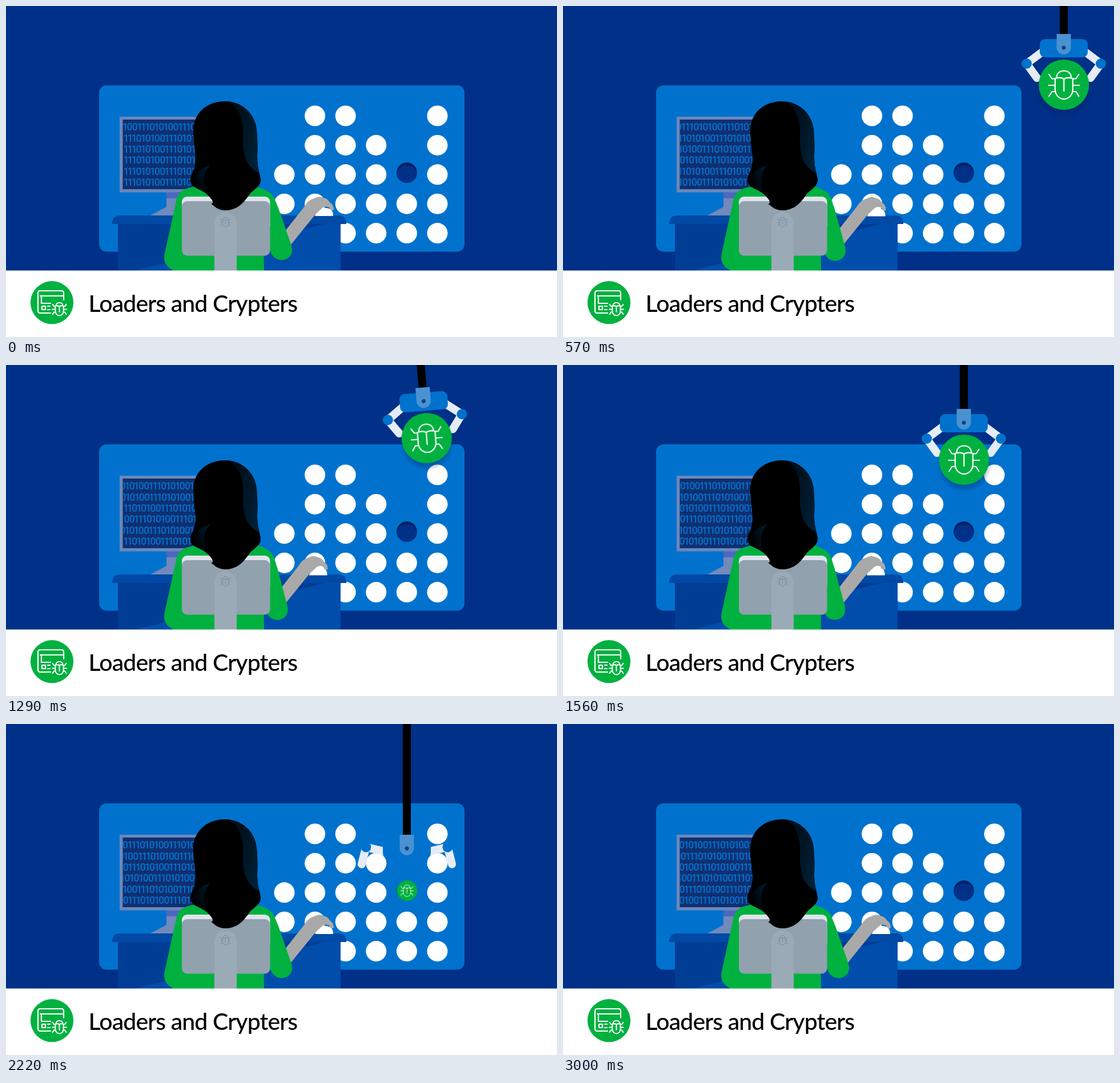
An HTML page that plays this animation: 965 px wide and 580 px high, repeating every 3.03 s.

```html
<!DOCTYPE html>
<html lang="en">
<head>
<meta charset="utf-8">
<title>Loaders and Crypters</title>
<style>
html, body { margin: 0; width: 100%; height: 100%; overflow: hidden; background: #fff; }
svg { display: block; width: 965px; height: 580px; }
.title { font: 500 41px Lato, sans-serif; letter-spacing: -.9px; }
.bits { font: 500 17.500px Roboto, sans-serif; fill: #0072ce; text-anchor: middle; }
.line { fill: none; stroke: #fff; stroke-linecap: round; stroke-linejoin: round; }
.limb { fill: none; stroke: #e6ecf5; stroke-width: 14; }
#ball { filter: drop-shadow(0 8px 3px rgba(0, 25, 85, .3)); }
</style>
</head>
<body>
<svg viewBox="0 0 965 580">
  <defs>
    <g id="bug">
      <path d="M-15.500-11Q-6-14 0-10Q6-14 15.500-11V8C15.500 18 8 25 0 25S-15.500 18-15.500 8ZM-13-12C-13-20-7-24.500 0-24.500S13-20 13-12M0-10V11"/>
      <path id="legs" d="M-26-18L-21-10.500H-15.500M-27 1H-15.500M-26 20L-21 12H-15"/>
      <use href="#legs" transform="scale(-1 1)"/>
    </g>
    <g id="claw-arm">
      <path class="limb" d="M-33 4L-65 28"/>
      <path class="limb" stroke-linecap="round" d="M-65 28L-47 53"/>
      <circle cx="-65" cy="28" r="9" fill="#0072ce"/>
    </g>
    <clipPath id="hole"><circle cx="702" cy="292" r="18"/></clipPath>
    <clipPath id="screen"><rect x="204.500" y="199" width="200" height="122"/></clipPath>
    <path id="hair" d="M383 167C352 167 328 188 328 218C328 245 334 260 331 279C329 292 322 296 323 308C326 320 344 321 353 331C360 338 366 345 359 347C366 350 368 358 386 358C408 357 418 342 428 328C438 319 447 314 446 303C444 290 440 285 440 262C441 240 440 230 439 217C436 188 413 167 383 167Z"/>
    <clipPath id="hairClip"><use href="#hair"/></clipPath>
    <linearGradient id="sheen" x1="0" y1="0" x2="1" y2=".4">
      <stop offset="0" stop-color="#00060c"/><stop offset="1" stop-color="#002036"/>
    </linearGradient>
    <linearGradient id="sheenLeft" x1="0" y1=".6" x2="1" y2="0">
      <stop offset="0" stop-color="#000"/><stop offset="1" stop-color="#001c31"/>
    </linearGradient>
  </defs>

  <rect width="965" height="464" fill="#003087"/>
  <rect x="163" y="139" width="640" height="291.500" rx="13" fill="#0072ce"/>
  <g id="dots" fill="#fff"></g>
  <g clip-path="url(#hole)">
    <circle cx="702" cy="292" r="18" fill="#001f63"/>
    <circle cx="702" cy="297" r="18" fill="#003087"/>
  </g>

  <!-- crane -->
  <g id="claw">
    <rect x="-7" y="-600" width="14" height="580"/>
    <use id="armL" href="#claw-arm"/>
    <g transform="scale(-1 1)"><use id="armR" href="#claw-arm"/></g>
    <rect x="-42" y="-15" width="84" height="32" rx="9" fill="#0072ce"/>
    <path d="M-12.500-24H12.500V-.5A12.500 12.500 0 0 1-12.500-.5Z" fill="#4b91d1"/>
    <circle r="3.500" fill="#0a4486"/>
  </g>
  <g id="ball">
    <circle r="44" fill="#00b140"/>
    <use href="#bug" class="line" stroke-width="2.200"/>
  </g>

  <!-- monitor -->
  <path d="M281 326H312V367H253L281 352Z" fill="#7189bb"/>
  <rect x="281" y="326" width="31" height="11" fill="#4c68c0"/>
  <rect x="199" y="194" width="210" height="132.500" fill="#6a87ba"/>
  <rect x="204.500" y="199" width="200" height="122" fill="#102f70"/>
  <g class="bits" id="bits" clip-path="url(#screen)"></g>

  <!-- desk -->
  <rect x="196" y="380" width="390" height="84" fill="#004dab"/>
  <path d="M196 380H566L225 464H196Z" fill="#003d95"/>
  <path d="M186 382V380Q187 367 200 367H582Q595 367 596 380V382Z" fill="#0049a4"/>

  <!-- person and chair -->
  <g id="forearm">
    <path d="M541 368Q546 354 558 354Q573 353 573 368Z" fill="#fff"/>
    <path d="M480 405L489 394L523 351Q530 339 540 337Q548 332 556 336Q563 337 567 344Q574 348 574 357Q570 361 566 353Q560 350 555 353L542 365L500 417L486 432Z" fill="#a9a9a9"/>
  </g>
  <path id="sleeve" d="M435 316Q463 322 470 337Q473 344 477 354L500 420Q505 440 486 445Q470 447 463 430L440 380Z" fill="#00b140"/>
  <path d="M335 316C308 319 301 327 298 342L278 433Q273 455 295 464H452L451 400L465 400V330Q455 320 430 316Z" fill="#00b140"/>
  <rect x="308" y="334" width="154.500" height="60" rx="9" fill="#dfe4ec"/>
  <rect x="308" y="342" width="154.500" height="95.500" rx="9" fill="#92a1ae"/>
  <path d="M365 464V381A19.500 19.500 0 0 1 404 381V464Z" fill="#9aaab7"/>
  <use href="#bug" class="line" transform="translate(384.500 379) scale(.33)" style="stroke:#8293a1" stroke-width="3.600"/>
  <use href="#hair"/>
  <g clip-path="url(#hairClip)">
    <path d="M386 166C408 176 416 198 415 225C414 255 417 278 441 292L450 292V166Z" fill="url(#sheen)"/>
    <path d="M358 279C340 284 330 292 325 316L350 326C344 304 347 290 358 279Z" fill="url(#sheenLeft)"/>
  </g>

  <!-- caption -->
  <rect y="463.500" width="965" height="117" fill="#fff"/>
  <circle cx="80.500" cy="519.700" r="37.600" fill="#00b140"/>
  <path class="line" stroke-width="2.200" d="M78 538H60Q56 538 56 534V503Q56 499 60 499H97Q101 499 101 503V515M60 508H101M62 508V521H78M63 526H69V532H63ZM73 526H77M73 532H77"/>
  <use href="#bug" class="line" transform="translate(93.500 531) scale(.46)" stroke-width="4.300"/>
  <text class="title" x="144.500" y="536">Loaders and Crypters</text>
</svg>
<script>
const LOOP = 3030, STEP = 30, DIGITS = '111010100';
const $ = id => document.getElementById(id);
const lerp = (a, b, k) => a + (b - a) * k;
const part = (t, a, b) => Math.min(1, Math.max(0, (t - a) / (b - a)));
const ease = k => (1 - Math.cos(Math.PI * k)) / 2;
const move = (t, a, b) => ease(part(t, a, b));
const advance = d => d === '1' ? 7 : 9.2;

// each string lists the filled columns of one row
$('dots').innerHTML = ['125', '1235', '01235', '012345', '2345'].map((cols, row) =>
  [...cols].map(c => `<circle cx="${487.5 + c * 53.6}" cy="${192.5 + row * 51.4}" r="18"/>`).join('')).join('');

// first digit, digits per second
const rows = [[6, 5], [0, 2.65], [0, 7.7], [0, 5.2], [0, 2.75], [0, 7.7]];
const text = DIGITS.repeat(6);
let width = 0;
const places = [...text].map(d => {
  const x = width + advance(d) / 2;
  width += advance(d);
  return x;
});
const period = width / 6, pitch = period / DIGITS.length;
$('bits').innerHTML = rows.map((_, i) =>
  `<text x="${places.map(x => x.toFixed(1)).join(' ')}" y="${218.3 + i * 19.3}">${text}</text>`).join('');
const lines = [...$('bits').children];

// time, sideways shift of the hand
const reach = [[0, 0], [300, -11], [850, -5.5], [1420, -11], [1950, 0], [LOOP, 0]];
function reachAt(t) {
  const i = reach.findIndex(p => p[0] > t);
  const [t0, a] = reach[i - 1], [t1, b] = reach[i];
  return lerp(a, b, move(t, t0, t1));
}

function crane(t) {
  const enter = part(t, 0, 570), cross = part(t, 570, 1555);
  const swing = Math.sin(Math.PI * (t < 570 ? enter : cross));
  return {
    x: t < 570 ? lerp(1062, 877, ease(enter)) : lerp(877, 702, ease(cross)),
    y: lerp(73, 101, ease(cross)) - swing * 44 + 126 * move(t, 1560, 2010),
    tilt: -6 * swing
  };
}

function draw(t) {
  lines.forEach((line, i) => {
    const [first, speed] = rows[i];
    const start = i ? 207 : 205 - places[first] + advance(DIGITS[first]) / 2;
    let x = start - speed * pitch * t / 1000;
    while (x < 205 - period) x += period;
    line.setAttribute('transform', `translate(${x} 0)`);
  });

  const { x, y, tilt } = crane(t);
  const rise = part(t, 2170, 2480) ** 2 * 350;
  const open = 50 * move(t, 2010, 2220);
  $('claw').setAttribute('transform', `translate(${x} ${y - rise}) rotate(${tilt})`);
  for (const id of ['armL', 'armR']) $(id).setAttribute('transform', `rotate(${open} -36 6)`);

  const size = lerp(1, .41, move(t, 2010, 2170));
  $('ball').setAttribute('transform', `translate(${x} ${y}) rotate(${tilt}) translate(.3 65) scale(${size})`);
  $('ball').style.opacity = 1 - part(t, 2730, 2970);
  $('ball').style.filter = t > 2160 ? 'none' : '';

  const r = reachAt(t);
  $('forearm').setAttribute('transform', `translate(${r} ${-r * .06})`);
  $('sleeve').setAttribute('transform', `rotate(${-r * .43} 460 330)`);
}

function tick() {
  draw(Math.floor(performance.now() % LOOP / STEP) * STEP);
  requestAnimationFrame(tick);
}
tick();
</script>
</body>
</html>
```
